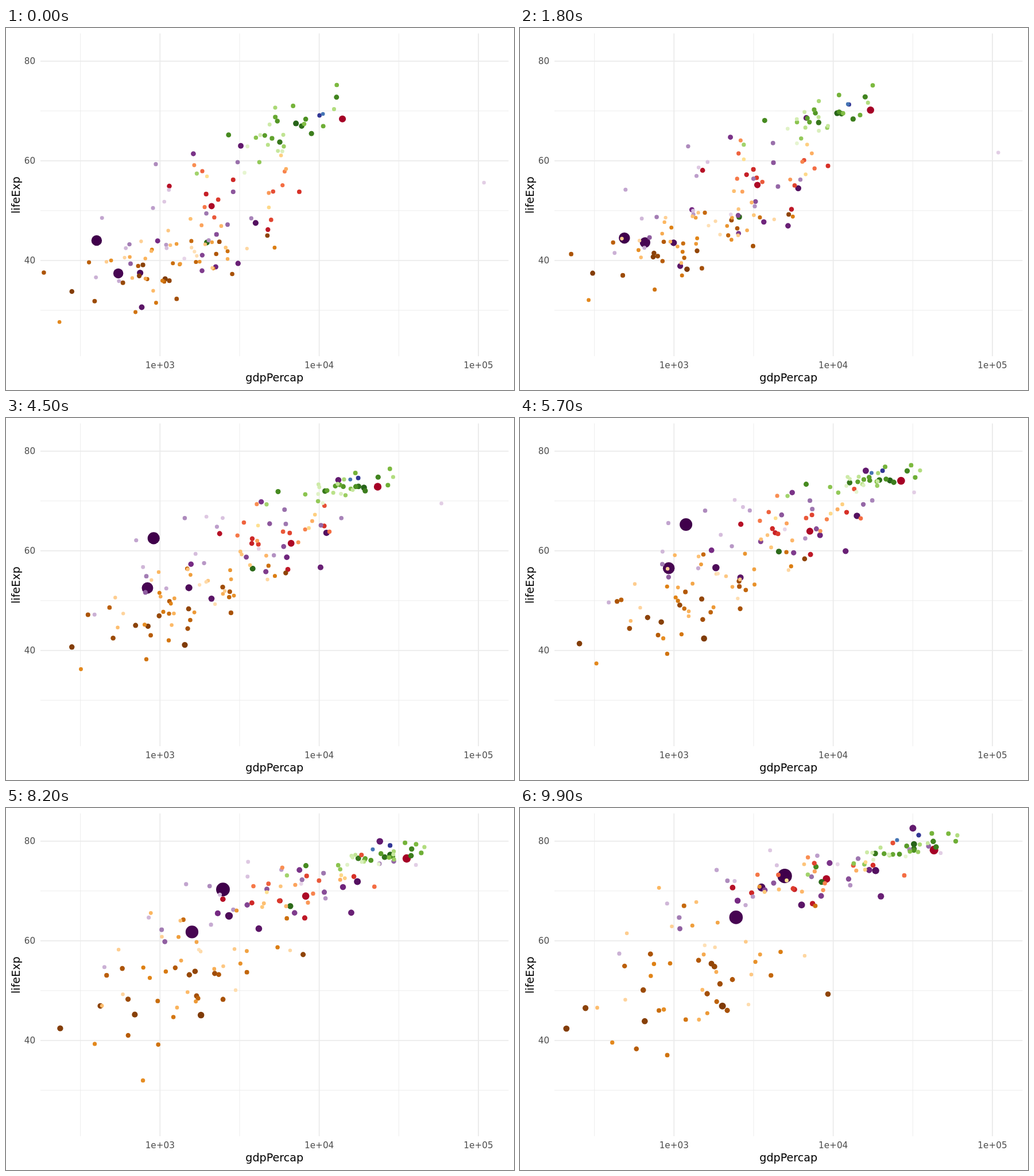
An HTML page with a canvas that plays this animation: 885x632 px, repeating every 10000 ms.

```html
<!DOCTYPE html>
<html lang="en">
<head>
<meta charset="utf-8">
<title>Life expectancy and income</title>
<style>
html, body { margin: 0; width: 100%; height: 100%; overflow: hidden; background: #fff; }
canvas { display: block; }
</style>
</head>
<body>
<canvas id="stage" width="885" height="632"></canvas>
<script>
const ctx = document.getElementById('stage').getContext('2d');
const FIRST = 1952, LAST = 2007, STEPS = 100, STEP_MS = 100;

const lerp = (a, b, t) => a + (b - a) * t;
const px = logGdp => 268.3 + 277.35 * (logGdp - 3);
const py = life => 753.8 - 8.7 * life;

// Curve through three values at the start, middle and end of the years.
const arc = ([a, b, c], t) => lerp(a, c, t) + (4 * b - 2 * a - 2 * c) * t * (1 - t);

// A region is a cloud around a moving centre; dots are ranked by population.
// Start, middle and end: income (log) and its spread, life expectancy,
// years of life gained per decade of income, spread around that slope.
// leads: a few marked dots with key points of year, income and life expectancy.
const regions = [
  {
    count: 52, ramp: ['7f3b08', 'b35806', 'e08214', 'fdb863', 'fee0b6'],
    pop: 95, decay: 10, grown: 0.27,
    income: [2.99, 3.12, 3.17], spread: [0.29, 0.33, 0.38],
    life: [39, 50.5, 55], slope: [4, 9, 9], scatter: [4.2, 4.6, 7],
    leads: [
      { rank: 0, pop: 135, keys: [[1952, 1077, 36.3], [2007, 2014, 46.9]] },
      { rank: 3, pop: 65, keys: [[1952, 781, 39.1], [1987, 673, 47.4], [2007, 278, 46.5]] },
      { rank: 4, pop: 44, keys: [[1952, 4725, 45], [1992, 7225, 61.9], [2007, 9270, 49.3]] },
      { rank: 28, pop: 9, keys: [[1952, 493, 40], [1982, 882, 46.2], [1992, 737, 23.6], [2007, 863, 46.2]] }
    ]
  },
  {
    count: 25, ramp: ['a50026', 'd73027', 'f46d43', 'fdae61', 'fee090'],
    pop: 70, decay: 6.5, grown: 0.45,
    income: [3.48, 3.77, 3.91], spread: [0.23, 0.2, 0.25],
    life: [53, 65, 73.4], slope: [18, 13, 7], scatter: [6.5, 4.3, 2.5],
    leads: [
      { rank: 0, pop: 301, keys: [[1952, 13990, 68.4], [2007, 42952, 78.2]] },
      { rank: 1, pop: 190, keys: [[1952, 2109, 50.9], [1977, 6660, 61.5], [2007, 9066, 72.4]] }
    ]
  },
  {
    count: 33, ramp: ['40004b', '762a83', '9970ab', 'c2a5cf', 'e7d4e8'],
    pop: 230, decay: 7, grown: 0.42,
    income: [3.12, 3.45, 3.66], spread: [0.3, 0.46, 0.53],
    life: [46, 61, 70.3], slope: [10, 10, 9], scatter: [6.5, 5, 3.6],
    leads: [
      { rank: 0, pop: 1318, keys: [[1952, 400, 44], [1957, 576, 50.5], [1962, 488, 44.5],
        [1967, 613, 58.4], [1992, 1656, 68.7], [2007, 4959, 73]] },
      { rank: 1, pop: 1110, keys: [[1952, 547, 37.4], [1962, 658, 43.6], [1987, 977, 58.5], [2007, 2452, 64.7]] },
      { rank: 2, pop: 223, keys: [[1952, 750, 37.5], [2007, 3541, 70.7]] },
      { rank: 5, pop: 127, keys: [[1952, 3217, 63], [1967, 9848, 71.4], [2007, 31656, 82.6]] },
      { rank: 31, pop: 2.5, keys: [[1952, 108382, 55.6], [1972, 109348, 67.7], [1982, 31354, 71.3], [2007, 47307, 77.6]] }
    ]
  },
  {
    count: 30, ramp: ['276419', '4d9221', '7fbc41', 'b8e186', 'e6f5d0'],
    pop: 80, decay: 8, grown: 0.75,
    income: [3.69, 4.11, 4.36], spread: [0.24, 0.19, 0.2],
    life: [64.8, 73, 77.8], slope: [14, 6, 8], scatter: [2.9, 1.3, 0.9],
    leads: [
      { rank: 0, pop: 82, keys: [[1952, 7144, 67.5], [1980, 21500, 73.3], [2007, 32170, 79.4]] },
      { rank: 1, pop: 71, keys: [[1952, 1969, 43.6], [2007, 8458, 71.8]] }
    ]
  },
  {
    count: 2, ramp: ['313695', '4575b4'], grown: 0.45,
    leads: [
      { rank: 0, pop: 20, keys: [[1952, 10040, 69.1], [2007, 34435, 81.2]] },
      { rank: 1, pop: 4, keys: [[1952, 10557, 69.4], [2007, 25185, 80.2]] }
    ]
  }
];

let seed = 2024;
function rand() {
  seed = (seed * 16807) % 2147483647;
  return seed / 2147483647;
}
const bell = () => (rand() + rand() + rand() - 1.5) * 2;

function rampColor(ramp, t) {
  const pos = t * (ramp.length - 1);
  const i = Math.min(Math.floor(pos), ramp.length - 2);
  const part = (hex, k) => parseInt(hex.slice(k, k + 2), 16);
  const rgb = [0, 2, 4].map(k => Math.round(lerp(part(ramp[i], k), part(ramp[i + 1], k), pos - i)));
  return `rgb(${rgb})`;
}

// Position along key points, straight on the log scale.
function keyedPath(keys) {
  return year => {
    const k = Math.max(1, keys.findIndex(key => key[0] >= year));
    const [y0, g0, l0] = keys[k - 1], [y1, g1, l1] = keys[k];
    const u = (year - y0) / (y1 - y0);
    return [lerp(Math.log10(g0), Math.log10(g1), u), lerp(l0, l1, u)];
  };
}

// Drift inside the region's cloud, with a slow sway.
function cloudPath(region) {
  const rich0 = bell(), rich1 = rich0 * 0.8 + bell() * 0.6;
  const fit0 = bell(), fit1 = fit0 * 0.6 + bell() * 0.8;
  const phase = rand() * 2 * Math.PI;
  return year => {
    const t = (year - FIRST) / (LAST - FIRST);
    const sway = Math.sin(t * 9 + phase);
    const offset = lerp(rich0, rich1, t) * arc(region.spread, t) + 0.025 * sway;
    const life = arc(region.life, t) + arc(region.slope, t) * offset
      + arc(region.scatter, t) * lerp(fit0, fit1, t);
    return [arc(region.income, t) + offset, Math.min(life, 82)];
  };
}

function makeDot(region, rank) {
  const lead = region.leads.find(l => l.rank === rank);
  return {
    color: rampColor(region.ramp, rank / (region.count - 1)),
    pop: lead ? lead.pop : region.pop * Math.exp(-rank / region.decay),
    grown: region.grown,
    path: lead ? keyedPath(lead.keys) : cloudPath(region)
  };
}

const dots = regions
  .flatMap(region => Array.from({ length: region.count }, (_, rank) => makeDot(region, rank)))
  .sort((a, b) => b.pop - a.pop);

function drawDot(dot, year) {
  const [logGdp, life] = dot.path(year);
  const pop = dot.pop * dot.grown ** ((LAST - year) / (LAST - FIRST));
  ctx.fillStyle = dot.color;
  ctx.beginPath();
  ctx.arc(px(logGdp), py(life), 3 + 9.6 * Math.sqrt(pop / 1318), 0, 2 * Math.PI);
  ctx.fill();
}

function line(x0, y0, x1, y1, width) {
  ctx.lineWidth = width;
  ctx.beginPath();
  ctx.moveTo(x0, y0);
  ctx.lineTo(x1, y1);
  ctx.stroke();
}

function text(str, x, y, size, color, align) {
  ctx.font = `${size}px "DejaVu Sans", sans-serif`;
  ctx.fillStyle = color;
  ctx.textAlign = align;
  ctx.fillText(str, x, y);
}

function drawAxes() {
  ctx.fillStyle = '#fff';
  ctx.fillRect(0, 0, 885, 632);
  ctx.strokeStyle = '#ebebeb';
  const across = (life, w) => line(60, py(life), 875.5, py(life), w);
  const down = (log, w) => line(px(log), 9.5, px(log), 573, w);
  [30, 50, 70].forEach(v => across(v, 0.95));
  [2.5, 3.5, 4.5].forEach(v => down(v, 0.95));
  [40, 60, 80].forEach(v => {
    across(v, 1.85);
    text(v, 51.2, Math.round(py(v) + 5.5), 15.28, '#4d4d4d', 'right');
  });
  [3, 4, 5].forEach(v => {
    down(v, 1.85);
    text('1e+0' + v, px(v), 594, 15.28, '#4d4d4d', 'center');
  });
  text('gdpPercap', 467.7, 617, 19.1, '#000', 'center');
  ctx.save();
  ctx.translate(24, 291.7);
  ctx.rotate(-Math.PI / 2);
  text('lifeExp', 0, 0, 19.1, '#000', 'center');
  ctx.restore();
}

function draw(now) {
  const step = Math.floor(now / STEP_MS) % STEPS;
  const year = lerp(FIRST, LAST, step / (STEPS - 1));
  drawAxes();
  dots.forEach(dot => drawDot(dot, year));
  requestAnimationFrame(draw);
}
requestAnimationFrame(draw);
</script>
</body>
</html>
```
